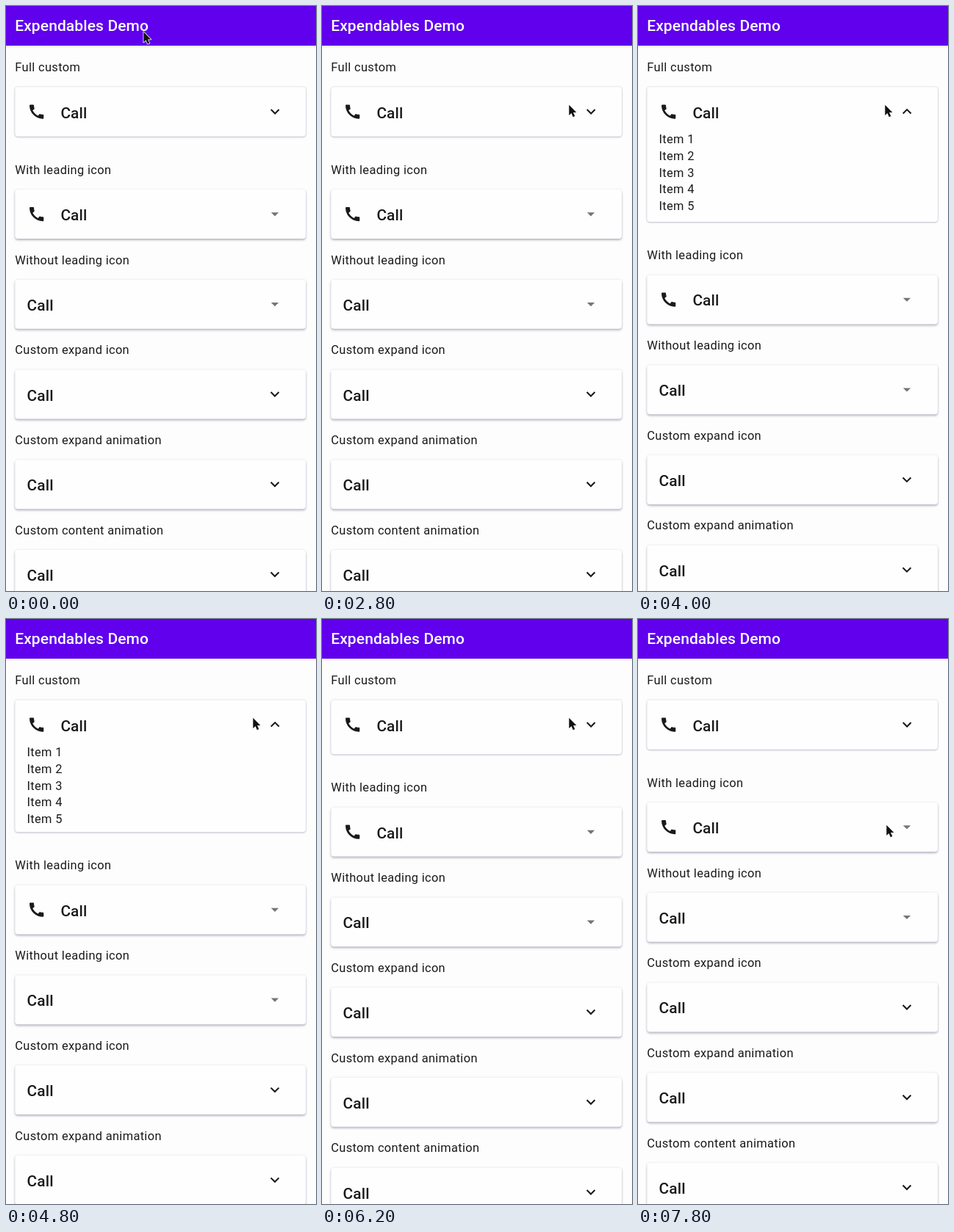
Recreate the animation shown at these times as an HTML page. Size 422 by 797 pixels, loop 8000 ms.

```html
<!DOCTYPE html>
<html lang="en">
<head>
<meta charset="utf-8">
<title>Expendables Demo</title>
<style>
  html, body { margin: 0; width: 100%; height: 100%; overflow: hidden; background: #fdfdfd; }
  svg { display: block; width: 100vw; height: 100vh; font-family: Roboto, sans-serif; fill: #1a1a1a; }
  .title { font-size: 21px; font-weight: 500; letter-spacing: .1px; fill: #fff; }
  .head { font-size: 20.8px; font-weight: 500; letter-spacing: .15px; }
  .body { font-size: 16.4px; letter-spacing: .35px; }
  .card { fill: #fefefe; filter: drop-shadow(0 2px 1.4px rgba(55, 45, 90, .3)) drop-shadow(0 .3px .8px rgba(55, 45, 90, .12)); }
  .card.flat { filter: drop-shadow(0 1px 1.2px rgba(55, 45, 90, .24)) drop-shadow(0 0 .8px rgba(55, 45, 90, .18)); }
  .bar { fill: #6000ec; filter: drop-shadow(0 1px 1.5px rgba(0, 0, 0, .12)); }
</style>
</head>
<body>
<svg viewBox="0 0 422 797" preserveAspectRatio="none">
  <defs>
    <path id="phone" d="M20.01 15.38c-1.23 0-2.42-.2-3.53-.56-.35-.12-.74-.03-1.01.24l-1.57 1.97c-2.83-1.35-5.48-3.9-6.89-6.83l1.95-1.66c.27-.28.35-.67.24-1.02-.37-1.11-.56-2.3-.56-3.53 0-.54-.45-.99-.99-.99H4.19C3.65 3 3 3.24 3 3.99 3 13.28 10.73 21 20.01 21c.71 0 .99-.63.99-1.18v-3.45c0-.54-.45-.99-.99-.99z"/>
    <path id="chevron" d="M-4.59-3.41 0 1.17l4.59-4.58L6-2 0 4l-6-6z"/>
    <path id="caret" d="M-5-2 0 3l5-5z" fill="#757575"/>
    <clipPath id="cardClip"><rect id="clipRect" x="12" y="110" width="396" height="68"/></clipPath>
    <clipPath id="rowClip"><rect x="29.3" y="119.3" width="361.7" height="49.7"/></clipPath>
  </defs>
  <rect width="422" height="797" fill="#fdfdfd"/>
  <g id="list"></g>
  <text class="body" x="12.3" y="89.4">Full custom</text>
  <rect id="card" class="card flat" x="12.3" y="110.3" width="395.7" height="67.4" rx="4"/>
  <g clip-path="url(#cardClip)">
    <g clip-path="url(#rowClip)"><circle id="ripple" cx="336" cy="140" r="0" fill="#000"/></g>
    <use href="#phone" transform="translate(28.8 131.3) scale(1.07)"/>
    <text class="head" x="74.4" y="152.6">Call</text>
    <use id="arrow" href="#chevron"/>
    <g id="items"></g>
  </g>
  <rect class="bar" width="422" height="54"/>
  <text class="title" x="12.2" y="34.2">Expendables Demo</text>
  <path id="cursor" d="M0 0V15L3.4 11.8 5.8 17.3 8.4 16.2 6 10.8H10.6z" fill="#111" stroke="#fff" stroke-width="1.6" stroke-linejoin="round" paint-order="stroke"/>
</svg>
<script>
const $ = id => document.getElementById(id);
const LOOP = 8, OPEN = 2.917, CLOSE = 5.64;
const GROWTH = 113, CARD_H = 67.4;

const sections = [
  ['With leading icon', 'caret', true],
  ['Without leading icon', 'caret'],
  ['Custom expand icon', 'chevron'],
  ['Custom expand animation', 'chevron'],
  ['Custom content animation', 'chevron']
];
$('list').innerHTML = sections.map(([label, icon, lead], i) => `
  <g transform="translate(0 ${250 + i * 122.75})">
    <text class="body" x="12.3" y="-21.2">${label}</text>
    <rect class="card" x="12.3" width="395.7" height="67" rx="4"/>
    ${lead ? '<use href="#phone" transform="translate(28.8 20.8) scale(1.07)"/>' : ''}
    <text class="head" x="${lead ? 74.4 : 28.6}" y="42">Call</text>
    <use href="#${icon}" transform="translate(366 33.3) scale(1.03)"/>
  </g>`).join('');
$('items').innerHTML = [1, 2, 3, 4, 5].map(n =>
  `<text class="body" x="28.5" y="${187.1 + (n - 1) * 22.7}">Item ${n}</text>`).join('');

const clamp = v => Math.min(1, Math.max(0, v));
const ease = v => v * v * (3 - 2 * v);
const span = (t, from, to) => ease(clamp((t - from) / (to - from)));

// Underdamped spring from 0 to 1
function spring(t, damping = 0.2, stiffness = 200) {
  if (t <= 0) return 0;
  const w = Math.sqrt(stiffness), root = Math.sqrt(1 - damping * damping), a = w * root * t;
  return 1 - Math.exp(-damping * w * t) * (Math.cos(a) + damping / root * Math.sin(a));
}

function drawRipple(t) {
  const age = t - (t < CLOSE - 0.5 ? OPEN : CLOSE) + 0.07;
  const alpha = age < 0 ? 0 : 0.1 * clamp(age / 0.075) * clamp((0.4 - age) / 0.17);
  $('ripple').setAttribute('r', 100 + 230 * ease(clamp(age / 0.225)));
  $('ripple').setAttribute('opacity', alpha);
}

function draw(t) {
  const shift = Math.max(-49.4, GROWTH * (t < CLOSE ? spring(t - OPEN) : 1 - spring(t - CLOSE)));
  $('list').setAttribute('transform', `translate(0 ${shift})`);
  $('card').setAttribute('height', CARD_H + shift);
  $('clipRect').setAttribute('height', CARD_H + shift);
  $('items').setAttribute('visibility', t >= OPEN && t < CLOSE ? 'visible' : 'hidden');

  const turn = 180 * (span(t, OPEN, OPEN + 0.27) - span(t, CLOSE, CLOSE + 0.27));
  $('arrow').setAttribute('transform', `translate(366.2 143.8) rotate(${turn}) scale(1.03)`);
  drawRipple(t);

  const go = span(t, 0.4, 2.1), next = span(t, 6.8, 7.6);
  const x = 187.3 + 149 * go + 2 * next, y = 35.3 + 99.4 * go + 146 * next;
  $('cursor').setAttribute('transform', `translate(${x} ${y}) scale(.95)`);
}

const start = performance.now();
function tick() {
  draw((performance.now() - start) / 1000 % LOOP);
  requestAnimationFrame(tick);
}
tick();
</script>
</body>
</html>
```
